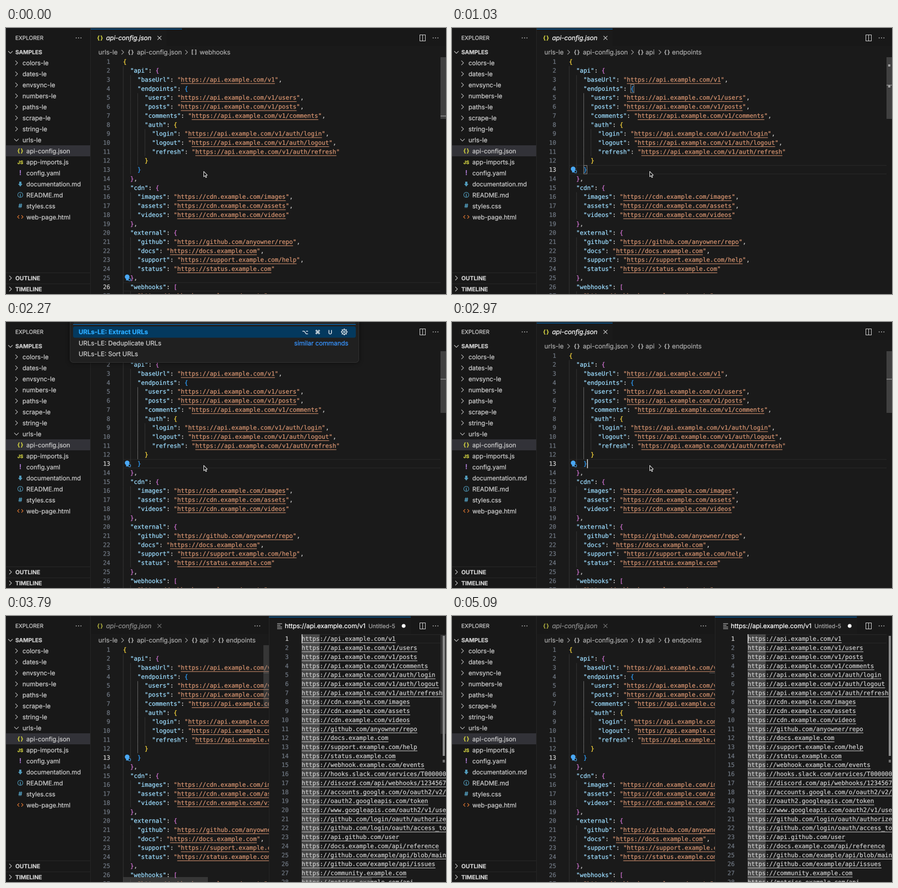
Recreate the animation shown at these times as an HTML page with a canvas. Size 800x483 px, loop 5120 ms.

```html
<!DOCTYPE html>
<html lang="en">
<head>
<meta charset="utf-8">
<title>Editor: extract URLs</title>
<style>
  html, body { margin: 0; width: 100%; height: 100%; overflow: hidden; background: #181818; }
  canvas { display: block; width: 800px; height: 483px; }
</style>
</head>
<body>
<canvas id="stage" width="1600" height="966"></canvas>
<script>
const ctx = document.getElementById('stage').getContext('2d');
const W = 800, H = 483, LOOP = 5120;
const CLICK = 480, OPEN = 1500, CLOSE = 2860, SPLIT = 3120;
const CELL = 6.577, ROW = 16.36;
const UI = 'Inter, "Open Sans", sans-serif';
const MONO = '10.92px "DejaVu Sans Mono", monospace';
const BRACKETS = ['#fbd83c', '#d273d4', '#2f9ffc'];
const SIDE = '#181818', EDIT = '#1a1a1a', EDGE = '#262626', TEXT = '#cccccc', BLUE = '#0078d4';

const API = 'https://api.example.com/v1';
const source = `{
  "api": {
    "baseUrl": "${API}",
    "endpoints": {
      "users": "${API}/users",
      "posts": "${API}/posts",
      "comments": "${API}/comments",
      "auth": {
        "login": "${API}/auth/login",
        "logout": "${API}/auth/logout",
        "refresh": "${API}/auth/refresh"
      }
    }
  },
  "cdn": {
    "images": "https://cdn.example.com/images",
    "assets": "https://cdn.example.com/assets",
    "videos": "https://cdn.example.com/videos"
  },
  "external": {
    "github": "https://github.com/anyowner/repo",
    "docs": "https://docs.example.com",
    "support": "https://support.example.com/help",
    "status": "https://status.example.com"
  },
  "webhooks": [
    "https://webhook.example.com/events",`.split('\n');

const found = source.join('\n').match(/https:[^"]+/g).concat([
  'hooks.slack.com/services/T00000000/B00000000',
  'discord.com/api/webhooks/123456789',
  'accounts.google.com/o/oauth2/v2/auth',
  'oauth2.googleapis.com/token',
  'www.googleapis.com/oauth2/v1/userinfo',
  'github.com/login/oauth/authorize',
  'github.com/login/oauth/access_token',
  'api.github.com/user',
  'docs.example.com/api/reference',
  'github.com/example/api/blob/main/README.md',
  'github.com/example/api/issues',
  'community.example.com',
  'metrics.example.com/api'
].map(s => 'https://' + s));

// Split every line into coloured tokens once.
let depth = 0;
const code = source.map(line => {
  const tokens = [];
  for (const m of line.matchAll(/"[^"]*"|[{}\[\]]|[^"{}\[\]\s]+/g)) {
    const s = m[0];
    let color = TEXT, url = false;
    if (s[0] === '"') {
      const key = line[m.index + s.length] === ':';
      color = key ? '#9cdcfe' : '#d4926f';
      url = !key;
    } else if ('{['.includes(s)) color = BRACKETS[depth++ % 3];
    else if ('}]'.includes(s)) color = BRACKETS[--depth % 3];
    tokens.push({ s, col: m.index, color, url });
  }
  return { tokens, indent: line.search(/\S/) / 2 };
});

function rect(x, y, w, h, color) {
  ctx.fillStyle = color;
  ctx.fillRect(x, y, w, h);
}

// A hairline stroke gives the slightly heavy look of smoothed screen type.
function text(s, x, y, color = TEXT, font = '11.5px ' + UI, align = 'left') {
  ctx.font = font;
  ctx.textAlign = align;
  ctx.fillStyle = ctx.strokeStyle = color;
  ctx.lineWidth = 0.25;
  ctx.lineJoin = 'round';
  ctx.fillText(s, x, y);
  ctx.strokeText(s, x, y);
}

const label = (s, x, y, color, style = '', size = 11.5) =>
  text(s, x, y + size * 0.36, color, `${style} ${size}px ${UI}`);

const mono = (s, x, y, color, align) => text(s, x, y + 3.8, color, MONO, align);

function path(points, color, width = 1, fill) {
  ctx.beginPath();
  points.forEach(([x, y]) => ctx.lineTo(x, y));
  if (fill) {
    ctx.closePath();
    ctx.fillStyle = fill;
    ctx.fill();
  }
  if (color) {
    ctx.strokeStyle = color;
    ctx.lineWidth = width;
    ctx.stroke();
  }
}

function disc(x, y, r, fill, stroke) {
  ctx.beginPath();
  ctx.arc(x, y, r, 0, 7);
  if (fill) { ctx.fillStyle = fill; ctx.fill(); }
  if (stroke) { ctx.strokeStyle = stroke; ctx.lineWidth = 1; ctx.stroke(); }
}

function chevron(x, y, down, color = TEXT) {
  path(down ? [[x - 4, y - 2], [x, y + 2], [x + 4, y - 2]]
            : [[x - 2, y - 4], [x + 2, y], [x - 2, y + 4]], color);
}

function dots(x, y) {
  for (let i = -1; i <= 1; i++) disc(x + i * 4.3, y, 0.9, TEXT);
}

function cross(x, y, color) {
  path([[x - 3.5, y - 3.5], [x + 3.5, y + 3.5]], color, 1.1);
  path([[x + 3.5, y - 3.5], [x - 3.5, y + 3.5]], color, 1.1);
}

const icon = (s, x, y, color, size = 10) =>
  text(s, x, y + 3.5, color, `bold ${size}px ${UI}`, 'center');

function braces(x, y, color) {
  icon('{', x - 3, y, color);
  icon('}', x + 3, y, color);
}

function sidebar() {
  rect(0, 0, 153, H, SIDE);
  rect(0, 213, 153, 20, '#323238');
  label('EXPLORER', 17, 18, TEXT, '', 10);
  dots(132, 18);
  chevron(8, 44, true);
  label('SAMPLES', 17, 44, TEXT, 'bold', 10.2);
  ['colors', 'dates', 'envsync', 'numbers', 'paths', 'scrape', 'string', 'urls'].forEach((s, i) => {
    const y = 63.3 + i * 20;
    chevron(19, y, s === 'urls');
    label(s + '-le', 30, y, TEXT, '', 11.3);
  });
  ['api-config.json', 'app-imports.js', 'config.yaml', 'documentation.md', 'README.md',
    'styles.css', 'web-page.html'].forEach((s, i) => label(s, 37, 223.3 + i * 20, TEXT, '', 11.2));
  braces(26, 223, '#cbcb41');
  icon('JS', 26, 243.3, '#cbcb41', 8.5);
  icon('!', 26, 263.3, '#a074c4', 12);
  path([[24, 279], [28, 279], [28, 283], [30, 283], [26, 288], [22, 283], [24, 283]], null, 1, '#519aba');
  disc(26, 303, 4.6, null, '#519aba');
  icon('i', 26, 303, '#519aba', 7.5);
  icon('#', 26, 323, '#519aba', 10.5);
  path([[24, 340], [21, 343], [24, 346]], '#e37933', 1.2);
  path([[28, 340], [31, 343], [28, 346]], '#e37933', 1.2);
  ['OUTLINE', 'TIMELINE'].forEach((s, i) => {
    const y = 454 + i * 20;
    rect(0, y - 10, 153, 1, EDGE);
    chevron(8, y, false);
    label(s, 17, y + 0.3, TEXT, 'bold', 10.3);
  });
  rect(153, 0, 1, H, EDGE);
}

function splitIcon() {
  ctx.strokeStyle = TEXT;
  ctx.lineWidth = 1;
  ctx.strokeRect(752.5, 12.5, 10, 11);
  rect(757, 13, 1, 11, TEXT);
}

function breadcrumb(clicked) {
  const gray = '#a9a9a9';
  label('urls-le', 168, 44, gray);
  chevron(212, 44, false, gray);
  braces(227, 44, gray);
  label('api-config.json', 238, 44, gray);
  chevron(328, 44, false, gray);
  if (!clicked) {
    icon('[ ]', 342, 43.5, gray, 10);
    label('webhooks', 352, 44, gray);
    return;
  }
  braces(343, 44, gray);
  label('api', 352, 44, gray);
  chevron(378, 44, false, gray);
  braces(391, 44, gray);
  label('endpoints', 400, 44, gray);
}

function bulb(y) {
  disc(220.3, y - 1.5, 4.3, '#4aa8f5');
  rect(218.3, y + 2.5, 4, 2.5, '#4aa8f5');
  disc(224.5, y + 3.5, 2.2, EDIT, '#4aa8f5');
}

function currentLine(x, top, right) {
  rect(x, top, right - x, 1, '#292929');
  rect(x, top + ROW - 1, right - x, 1, '#292929');
}

const underline = (x, mid, chars, color) => rect(x, mid + 6.7, chars * CELL, 1, color);

const slider = (x, y, w, h, alpha = 1) =>
  rect(x, y, w, h, `rgba(121,121,121,${0.4 * alpha})`);

function jsonPane(st) {
  const x0 = 212.7, top = 52.8, right = st.split ? 478 : W;
  const rowTop = n => top + (n - 1) * ROW;
  const line = st.clicked ? 13 : 26;
  ctx.save();
  ctx.beginPath();
  ctx.rect(154, 0, right - 154, H);
  ctx.clip();
  rect(154, 0, right - 154, H, EDIT);
  rect(154, 0, right - 154, 33, SIDE);
  if (!st.split) {
    rect(154, 1.5, 138, 32, EDIT);
    rect(154, 1.5, st.clicked ? 138 : 166, 1, BLUE);
  }
  braces(171, 18, st.split ? '#a3a33c' : '#cbcb41');
  label('api-config.json', 182, 18, st.split ? '#909090' : '#ffffff', 'italic');
  cross(279, 18, st.split ? '#777777' : TEXT);
  breadcrumb(st.clicked);
  if (!st.split) currentLine(213, rowTop(line), 790);

  code.forEach((row, i) => {
    const y = rowTop(i + 1), mid = y + ROW / 2;
    for (let g = 0; g < row.indent; g++) {
      const active = st.clicked && g === 2 && i >= 4 && i <= 11;
      rect(x0 + g * 2 * CELL, y, 1, ROW, active ? '#646464' : '#343434');
    }
    mono(i + 1, 189.5, mid, i + 1 === line ? TEXT : '#6e7681', 'right');
    for (const t of row.tokens) {
      const x = x0 + t.col * CELL;
      mono(t.s, x, mid, t.color);
      if (t.url) underline(x + CELL, mid, t.s.length - 2, t.color);
    }
  });

  if (st.match) {
    ctx.strokeStyle = '#888888';
    ctx.lineWidth = 1;
    [[17, 4], [4, 13]].forEach(([col, n]) =>
      ctx.strokeRect(x0 + col * CELL + 0.4, rowTop(n) + 0.5, 6, 15.3));
  }
  if (st.caret) rect(x0 + 5 * CELL, rowTop(13), 1.5, ROW, '#dddddd');
  bulb(st.clicked ? 257.3 : 453.3);

  if (st.split) {
    slider(468, 53, 10, 113, st.bars);
    slider(213, 474, 154, 9, st.bars);
    rect(468, 103, 10, 1, '#555555');
    dots(457, 18);
  } else {
    slider(790, 53, 10, 112);
    rect(790, st.clicked ? 103 : 159, 10, 1.5, '#8a8a8a');
    if (st.match) {
      rect(793, 66, 4, 4, '#a0a0a0');
      rect(793, 104, 4, 4, '#a0a0a0');
    }
    splitIcon();
    dots(781, 18);
  }
  ctx.restore();
}

function urlPane(bars) {
  const x0 = 537.5, top = 33.2;
  rect(478, 0, 322, H, EDIT);
  rect(736, 0, 64, 33, SIDE);
  rect(478, 0, 1, H, EDGE);
  rect(478, 1.5, 258, 1, BLUE);
  for (let i = 0; i < 4; i++) rect(493, 13.5 + i * 3, i === 1 ? 6 : 9, 1, TEXT);
  label(API, 507, 18, '#ffffff');
  label('Untitled-5', 659, 18.3, '#a5a5a5', '', 10.3);
  disc(723, 18, 3.5, '#ffffff');
  splitIcon();
  dots(781, 18);
  currentLine(538, top, 790);
  rect(x0, top, 5 * CELL, H - top, '#484848');
  found.forEach((s, i) => {
    const mid = top + (i + 0.5) * ROW;
    mono(i + 1, 514, mid, i ? '#6e7681' : TEXT, 'right');
    mono(s, x0, mid, TEXT);
    underline(x0, mid, s.length, TEXT);
  });
  rect(x0, top, 1.5, ROW, '#dddddd');
  slider(790, 34, 10, 180, bars);
  slider(539, 474, 126, 9, bars);
  rect(794, 36, 4, 218, '#8a8a8a');
  rect(794, 261, 4, 5, '#707070');
}

function palette() {
  ctx.save();
  ctx.shadowColor = 'rgba(0,0,0,0.6)';
  ctx.shadowBlur = 16;
  ctx.beginPath();
  ctx.roundRect(116.5, -10, 525, 83.5, 6);
  ctx.fillStyle = '#202020';
  ctx.fill();
  ctx.restore();
  ctx.strokeStyle = '#303030';
  ctx.lineWidth = 1;
  ctx.stroke();
  rect(123, 0, 512, 4, '#2a2a2a');
  rect(122, 4, 514, 1, BLUE);
  ctx.beginPath();
  ctx.roundRect(122, 8, 514, 20.5, 3);
  ctx.fillStyle = '#04395e';
  ctx.fill();
  label('URLs-LE: Extract URLs', 132, 18, '#2aaaff', 'bold');
  const keys = '10px "DejaVu Sans", sans-serif';
  ['⌥', '⌘', 'U'].forEach((s, i) => text(s, 544 + i * 22.7, 22, '#ffffff', keys, 'center'));
  disc(615, 18, 4.2, null, '#ffffff');
  disc(615, 18, 1.6, null, '#ffffff');
  for (let a = 0; a < 8; a++) {
    const c = Math.cos(a * Math.PI / 4), s = Math.sin(a * Math.PI / 4);
    path([[615 + 4 * c, 18 + 4 * s], [615 + 6 * c, 18 + 6 * s]], '#ffffff', 1.6);
  }
  label('URLs-LE: Deduplicate URLs', 132, 38.5);
  label('similar commands', 524, 38.5, '#3794ff');
  label('URLs-LE: Sort URLs', 132, 57.8);
}

function pointer(x, y) {
  path([[x, y], [x, y + 9.5], [x + 2.2, y + 7.6], [x + 3.8, y + 11], [x + 5.3, y + 10.3],
    [x + 3.8, y + 7], [x + 6.6, y + 6.8], [x, y]], '#e0e0e0', 1, '#101010');
}

function draw(t) {
  const open = t >= OPEN && t < CLOSE;
  const clicked = t >= CLICK, split = t >= SPLIT;
  const since = t < OPEN ? t - CLICK : t - CLOSE;
  const st = {
    clicked, split,
    match: clicked && t < OPEN,
    caret: clicked && !open && !split && since % 1000 < 500,
    // Idle scrollbars fade out half a second after the split.
    bars: Math.min(1, Math.max(0, 1 - (t - SPLIT - 500) / 700))
  };
  ctx.setTransform(2, 0, 0, 2, 0, 0);
  ctx.textRendering = 'geometricPrecision';
  sidebar();
  jsonPane(st);
  if (split) urlPane(st.bars);
  else pointer(359.5, 260.5);
  if (open) palette();
}

const start = performance.now();
function tick() {
  draw((performance.now() - start) % LOOP);
  requestAnimationFrame(tick);
}
tick();
</script>
</body>
</html>
```
